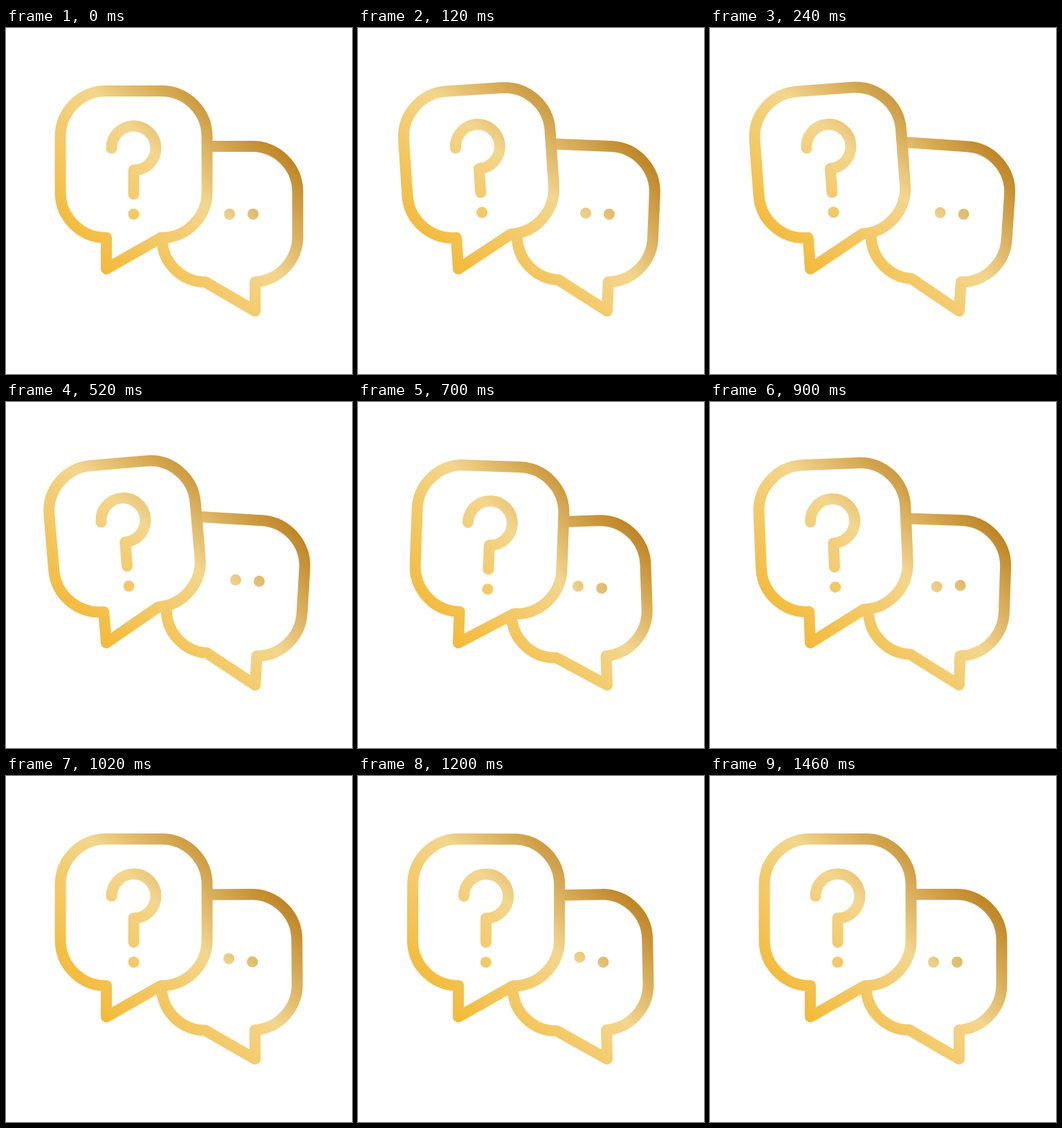
Recreate the animation shown at these times as an HTML page. Size 500x500 px, loop 2000 ms.

```html
<!DOCTYPE html>
<html lang="en">
<head>
<meta charset="utf-8">
<title>Chat bubbles</title>
<style>
  html, body { margin: 0; width: 100%; height: 100%; overflow: hidden; background: #fff; }
  svg { display: block; width: 100vw; height: 100vh; }
  .line { fill: none; stroke: url(#gold); stroke-width: 16; stroke-linecap: round; stroke-linejoin: round; }
  .solid { fill: #fff; }
  .dot { fill: url(#gold); }
</style>
</head>
<body>
<svg viewBox="0 0 500 500">
  <defs>
    <linearGradient id="gold" gradientUnits="userSpaceOnUse" x1="140" y1="360" x2="362" y2="138">
      <stop offset="0" stop-color="#f4b936"/>
      <stop offset=".57" stop-color="#f3d68e"/>
      <stop offset="1" stop-color="#be8424"/>
    </linearGradient>
  </defs>
  <g id="reply">
    <path class="line" d="M260 171H355.5A66 66 0 0 1 421.5 237V301A66 66 0 0 1 360 367V409L288 367A63 63 0 0 1 225.500 305"/>
    <circle id="dot1" class="dot" cx="323" cy="269" r="8"/>
    <circle id="dot2" class="dot" cx="357" cy="269" r="8"/>
  </g>
  <g id="ask">
    <path class="line solid" d="M144.500 91H224.500A66 66 0 0 1 290.500 157V237A66 66 0 0 1 224 303L145 348V303A66 66 0 0 1 78.500 237V157A66 66 0 0 1 144.500 91Z"/>
    <path class="line" d="M152.500 173.500A32 32 0 1 1 184.500 205.500V240"/>
    <circle class="dot" cx="184.500" cy="269" r="8"/>
  </g>
</svg>
<script>
  const LOOP = 2000;
  const BEAT = 180;
  const part = id => document.getElementById(id);

  // Swings from rest through each peak angle, one per beat, and back to rest.
  function swing(t, peaks) {
    const beat = Math.max(0, t / BEAT);
    const i = Math.floor(beat);
    const from = peaks[i - 1] || 0;
    const to = peaks[i] || 0;
    return from + (to - from) * (1 - Math.cos((beat - i) * Math.PI)) / 2;
  }

  // Consecutive soft hops of equal length, one per height.
  function hop(t, length, heights) {
    const height = heights[Math.floor(t / length)] || 0;
    return -height * Math.sin(t / length * Math.PI) ** 2;
  }

  const turn = (id, angle, x, y) => part(id).setAttribute('transform', `rotate(${angle} ${x} ${y})`);
  const lift = (id, dy) => part(id).setAttribute('transform', `translate(0 ${dy})`);

  function draw(t) {
    turn('ask', swing(t, [-5, -2, -5, 2.3, -2.4, 0.8]), 145, 348);
    turn('reply', swing(t - 25, [4.4, -1, 4.1, -3, 2.1, -2.4]), 360, 409);
    lift('dot1', hop(t - 220, 620, [10, 8.5]));
    lift('dot2', hop(t - 340, 360, [10, 4]));
  }

  const start = performance.now();
  function tick() {
    draw((performance.now() - start) % LOOP);
    requestAnimationFrame(tick);
  }
  tick();
</script>
</body>
</html>
```
